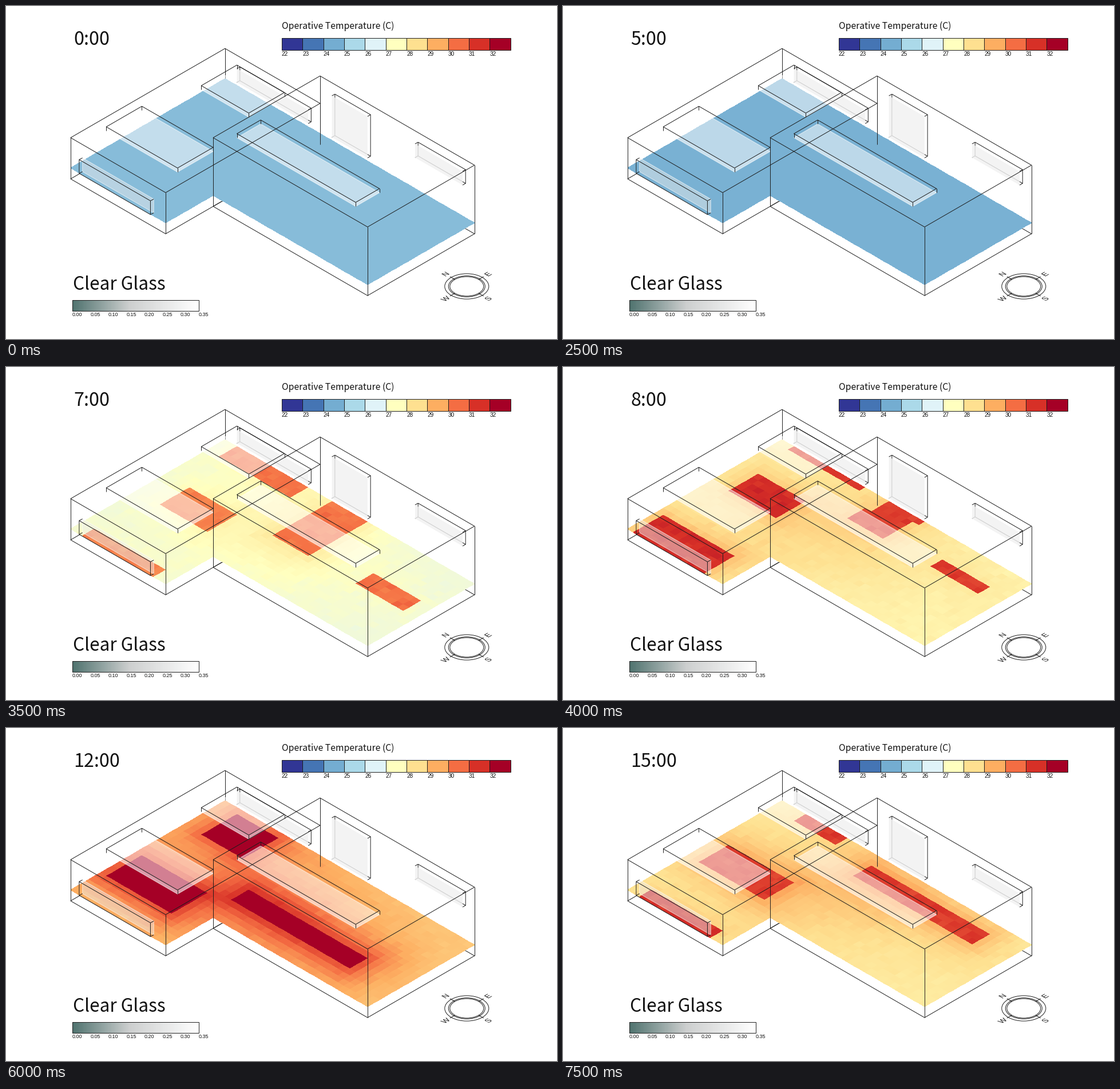
Recreate the animation shown at these times as a matplotlib script. Size 963x582 px, loop 8 s.

```python
import numpy as np
import matplotlib.pyplot as plt
from matplotlib.animation import FuncAnimation
from matplotlib.colors import LinearSegmentedColormap
from matplotlib.patches import Ellipse, PathPatch, Polygon, Rectangle
from matplotlib.textpath import TextPath
from matplotlib.transforms import Affine2D

W, H, DPI = 963, 582, 100
HOURS = 16
INK = "#1c1c1c"
UI, LABEL = "Noto Sans CJK JP", "Liberation Sans"
SCALE = ["#313695", "#4575b4", "#74add1", "#abd9e9", "#e0f3f8", "#ffffbf",
         "#fee090", "#fdae61", "#f46d43", "#d73027", "#a50026"]
TEMP = LinearSegmentedColormap.from_list("temp", SCALE, N=512)
GLASS = LinearSegmentedColormap.from_list(
    "glass", [(0, "#50736f"), (0.45, "#cdcfcf"), (1, "#ffffff")])

# Isometric floor grid: a runs to the lower right, b to the lower left.
NA, NB = 42, 26
UX, UY = 10.38, 6.0
LOW, HIGH = 52.3, 100.3  # roof heights above the floor grid

# Openings as (a0, a1, b0, b1, bottom, top).
SKYLIGHTS = [(2, 14, 16, 22, LOW, LOW), (4, 12, 2, 8, LOW, LOW), (18, 38, 12, 16, HIGH, HIGH)]
BACK = [(2, 14, 0, 0, 5, 29), (18, 24, 0, 0, 5, 77.5), (32, 40, 0, 0, 53.5, 77.5)]
FRONT = [(2, 14, NB, NB, 5, 29)]
WALL = 0.7  # wall depth in cells


def iso(a, b, up=0):
    return 383 + UX * (a - b), 126.5 + UY * (a + b) - up


fig = plt.figure(figsize=(W / DPI, H / DPI), dpi=DPI, facecolor="white")
ax = fig.add_axes([0, 0, 1, 1])
ax.axis("off")


def line(*pts, z=5, color=INK):
    xs, ys = zip(*pts)
    ax.plot(xs, ys, color=color, lw=0.7, zorder=z, solid_capstyle="butt")


def poly(pts, color, alpha, z, edge=None):
    ax.add_patch(Polygon(pts, closed=True, fc=color, ec="none", alpha=alpha, zorder=z))
    if edge:
        line(*pts, pts[0], z=z + 0.1, color=edge)


def cage(top, base, z=5):
    """First loop plus the struts that join it to the second."""
    line(*top, top[0], z=z)
    for pair in zip(top, base):
        line(*pair, z=z)


def write(x, y, s, px, family=UI):
    return ax.text(x, y, s, size=px * 0.72, family=family, color="#111111",
                   va="baseline", zorder=6)


def shift(pts, dx, dy):
    return [(x + dx, y + dy) for x, y in pts]


def room(a0, a1, b1, roof):
    plan = [(a0, 0), (a1, 0), (a1, b1), (a0, b1)]
    top = [iso(a, b, roof) for a, b in plan]
    base = [iso(a, b, -19.7) for a, b in plan]
    line(*top, top[0])
    line(*base, base[0], z=1)
    for i, pair in enumerate(zip(top, base)):
        line(*pair, z=5 if i else 1)


def skylight(a0, a1, b0, b1, up, _):
    pane = [iso(a, b, up) for a, b in ((a0, b0), (a1, b0), (a1, b1), (a0, b1))]
    top = shift(pane, 0, -7)
    poly(pane, "white", 0.5, 3, edge="#ffffffb0")
    for i in (1, 2):
        poly([top[i], top[i + 1], pane[i + 1], pane[i]], "white", 0.22, 3.3)
    cage(top, pane)


def window(a0, a1, b, _, bottom, top, front=False):
    pane = [iso(a0, b, top), iso(a1, b, top), iso(a1, b, bottom), iso(a0, b, bottom)]
    if front:
        poly(pane, "#ececec", 0.48, 4, edge="#ffffffa0")
        cage(shift(pane, -5.8, 3), pane)
    else:
        cage(shift(pane, 5.2, -3), pane, z=3)
        poly(pane, "#f1f1f1", 0.82, 4)


def legends():
    write(482, 40, "Operative Temperature (C)", 15.7)
    step = 400 / len(SCALE)
    for i, c in enumerate(SCALE):
        ax.add_patch(Rectangle((482 + i * step, 55.5), step, 21, fc=c, ec=INK, lw=0.7))
        write(482 + i * step, 87, str(22 + i), 10, LABEL)

    write(117, 496.5, "Clear Glass", 31.5)
    ax.imshow(np.linspace(0, 1, 256)[None], cmap=GLASS, extent=(116, 337, 533, 514),
              aspect="auto", interpolation="bilinear", zorder=2)
    ax.add_patch(Rectangle((116, 514), 221, 19, fc="none", ec=INK, lw=0.7, zorder=3))
    for i in range(8):
        write(116 + i * 31.5, 542, f"{i * 0.05:.2f}", 9, LABEL)


def compass(cx=805.5, cy=490):
    for rx in (38.5, 32, 29.5):
        ax.add_patch(Ellipse((cx, cy), 2 * rx, 1.15 * rx, fc="none", ec=INK, lw=0.7))
    for letter, sx, sy in (("N", -1, -1), ("E", 1, -1), ("S", 1, 1), ("W", -1, 1)):
        dx, dy = 0.866 * sx, 0.5 * sy
        line((cx + 24 * dx, cy + 24 * dy), (cx + 34 * dx, cy + 34 * dy))
        path = TextPath((0, 0), letter, size=13, prop={"family": LABEL})
        box = path.get_extents()
        tilt = Affine2D().translate(-(box.x0 + box.x1) / 2, -(box.y0 + box.y1) / 2)
        tilt += Affine2D(np.array([[0.866, -0.866, cx + 43 * dx],
                                   [-0.5, -0.5, cy + 43 * dy], [0, 0, 1]]))
        ax.add_patch(PathPatch(tilt.transform_path(path), fc=INK, ec="none"))


room(0, 16, 26, LOW)
room(16, 42, 18, HIGH)
for s in SKYLIGHTS:
    skylight(*s)
for w in BACK:
    window(*w)
for w in FRONT:
    window(*w, front=True)
legends()
compass()
clock = write(118.5, 67.5, "0:00", 32.3)

B, A = np.mgrid[0:NB, 0:NA] + 0.5
OUTSIDE = (A > 16) & (B > 18)


def sunbeam(hour, a0, a1, b0, b1, z0, z1):
    """Distance of every cell from the light that falls through an opening."""
    da = 0.005 * (hour - 11.2) ** 4 - 1.45
    db = 6 * np.tan(0.205 * (11.4 - hour))
    z0, z1 = z0 / LOW, z1 / LOW
    if b0 == b1:
        b0 = b1 = b0 + (WALL if b0 else -WALL)
    lean = da * np.clip((B - b0) / db, z0, z1)
    left, right = np.round(a0 + 0.2 + lean), np.round(a1 - 0.2 + lean)
    near, far = sorted((b0 + db * z0, b1 + db * z1))
    near, far = np.round(near), np.round(far - 0.12 * abs(db))
    return np.hypot(np.maximum(np.maximum(left - A, A - right), 0),
                    np.maximum(np.maximum(near - B, B - far), 0))


def heat(hour):
    """Cell temperatures over the L-shaped floor."""
    if hour < 6:
        return np.ma.array(np.full(A.shape, 24.35 - 0.05 * hour), mask=OUTSIDE)
    base = 28.5 - (0.125 if hour < 11 else 0.055) * (hour - 11) ** 2
    grain = np.random.default_rng(hour).normal(0, 1, A.shape)
    temp = base + 0.6 * np.exp(-((A - 18) ** 2 + (B - 9) ** 2) / 150)
    warmth = 0.11 * min(1, (hour - 5) / 4)
    sky_gain = 4.4 * np.cos(0.19 * (hour - 11))
    halo = np.zeros(A.shape)
    sunlit = []
    for hole in SKYLIGHTS + BACK + FRONT:
        gain = sky_gain if hole in SKYLIGHTS else 3.4
        dist = sunbeam(hour, *hole)
        lit = (dist == 0) & ~OUTSIDE
        if lit.any():
            size = min(1, lit.sum() / 55)
            halo += (size * warmth * gain ** 2 * np.exp(-dist / 3.3)) ** 2
            sunlit.append((lit, gain))
    temp += np.sqrt(halo) + 0.05 * grain
    for lit, gain in sunlit:
        temp[lit] = base + gain + 0.1 * grain[lit]
    return np.ma.array(temp, mask=OUTSIDE)


EB, EA = np.mgrid[0:NB + 1, 0:NA + 1]
floor = ax.pcolormesh(*iso(EA, EB), heat(0), cmap=TEMP, vmin=22, vmax=32, zorder=2)
ax.set_xlim(0.2, W + 0.2)
ax.set_ylim(H, 0)


def update(hour):
    floor.set_array(heat(hour))
    clock.set_text(f"{hour}:00")
    return floor, clock


anim = FuncAnimation(fig, update, frames=HOURS, interval=500, repeat=True, repeat_delay=0)
plt.show()
```
